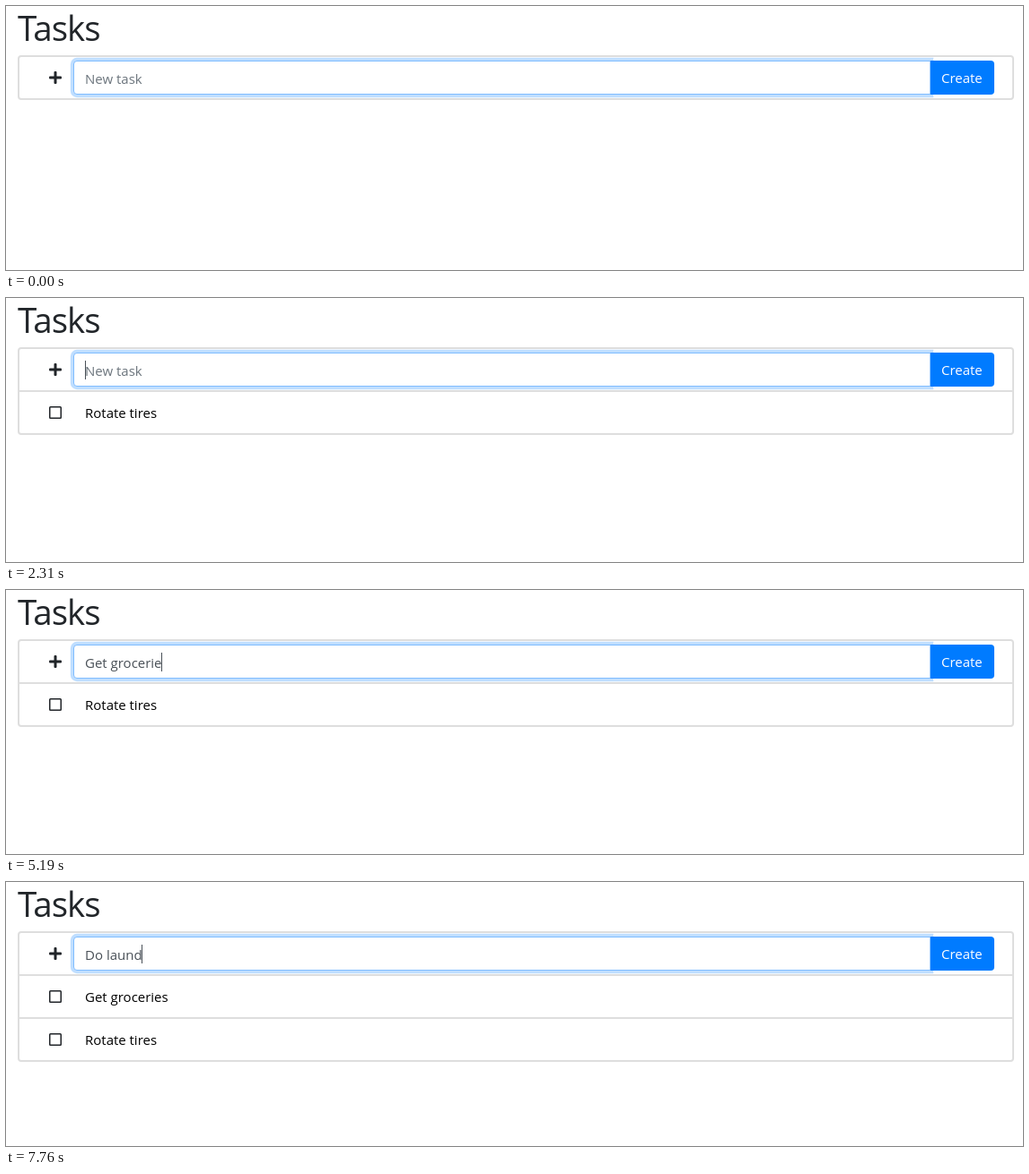
Animation, 1133 px wide and 295 px high, one loop 7.99 s. Source, as an HTML page:

```html
<!DOCTYPE html>
<html lang="en">
<head>
<meta charset="utf-8">
<title>Tasks</title>
<style>
  html, body { margin: 0; width: 100%; height: 100%; overflow: hidden; background: #fff; }
  svg { display: block; }
  text { font: 15px "Open Sans", "Noto Sans", sans-serif; white-space: pre; }
  .title { font-size: 38.5px; font-weight: 500; letter-spacing: -1px; fill: #212529; }
  .line { fill: none; stroke: #dedede; stroke-width: 2; }
  .box { fill: none; stroke: #212529; stroke-width: 1.5; }
</style>
</head>
<body>
<svg width="1133" height="295" viewBox="0 0 1133 295">
  <text class="title" x="13" y="39">Tasks</text>
  <rect id="frame" class="line" x="14" y="56" width="1108" height="48" rx="3"/>

  <g fill="#212529">
    <rect x="48" y="78.5" width="14" height="3" rx="1"/>
    <rect x="53.5" y="73" width="3" height="14" rx="1"/>
  </g>

  <path d="M1029 61H1097a4 4 0 0 1 4 4V95a4 4 0 0 1-4 4H1029Z" fill="#007bff"/>
  <text x="1042" y="86" fill="#fff">Create</text>
  <path d="M1033.2 57.8H79a7.2 7.2 0 0 0-7.2 7.2V95a7.2 7.2 0 0 0 7.2 7.2H1033.2Z" fill="#007bff" fill-opacity=".25"/>
  <path d="M1029.5 61.5H79a3.5 3.5 0 0 0-3.5 3.5V95a3.5 3.5 0 0 0 3.5 3.5H1029.5Z" fill="#fff" stroke="#80bdff"/>

  <text id="field" x="88" y="87"></text>
  <rect id="caret" y="70" width="1" height="21" fill="#495057"/>

  <g id="rows"></g>
</svg>
<script>
const LOOP = 7990, LEFT = 88, ROW = 48;
const get = id => document.getElementById(id);
const frame = get("frame"), field = get("field"), caret = get("caret"), rows = get("rows");

// Each state: time, typed text, finished tasks, caret shown
const states = [[0, "", [], false], [70, "", [], true]];

// One keystroke per time, adding letters to what is already typed
function type(word, done, times, start = 0) {
  times.forEach((t, i) => states.push([t, word.slice(0, start + i + 1), done, true]));
}

const tires = ["Rotate tires"];
const both = ["Get groceries", "Rotate tires"];

type(tires[0], [], [240]);
states.push([780, "R", [], false]);
type(tires[0], [], [910, 1040, 1170, 1300, 1430, 1560, 1700, 1850, 1930, 2015, 2100], 1);
states.push([2190, "", [], true], [2290, "", tires, true]);
type(both[0], tires, [2540, 3090, 3180, 3410, 3870, 4250, 4370, 4480, 4650, 4720, 5040, 5170, 5300]);
states.push([5450, "", tires, true], [5590, "", both, true]);
type("Do laund", both, [5910, 6060, 6530, 6760, 7160, 7300, 7610, 7760]);

function rowMarkup(label, i) {
  const y = 104 + ROW * i;
  return `<path class="line" d="M14 ${y}H1122"/>
    <rect class="box" x="48.75" y="${y + 17.75}" width="12.5" height="12.5" rx=".8"/>
    <text x="${LEFT}" y="${y + 30}">${label}</text>`;
}

let shown = null;

function draw(time) {
  const state = states.findLast(s => s[0] <= time);
  if (state === shown) return;
  const [, text, done, caretOn] = state;

  field.textContent = text || "New task";
  field.setAttribute("fill", text ? "#495057" : "#6c757d");
  const width = text ? field.getComputedTextLength() : 0;
  caret.setAttribute("x", Math.floor(LEFT + width));
  caret.setAttribute("visibility", caretOn ? "visible" : "hidden");

  if (!shown || shown[2] !== done) {
    rows.innerHTML = done.map(rowMarkup).join("");
    frame.setAttribute("height", ROW * (done.length + 1));
  }
  shown = state;
}

const began = performance.now();
function tick() {
  draw((performance.now() - began) % LOOP);
  requestAnimationFrame(tick);
}
tick();
</script>
</body>
</html>
```
